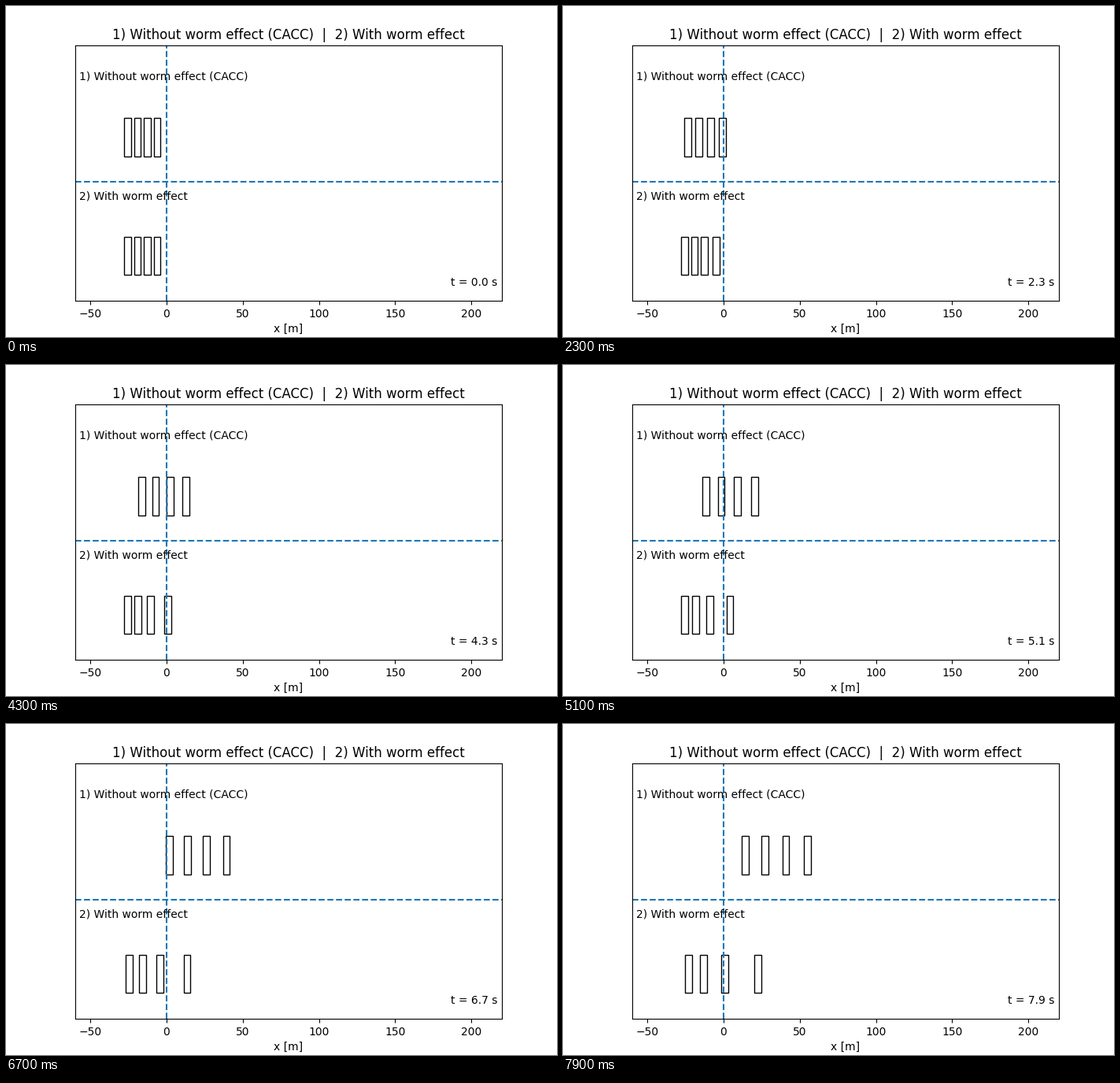
Write a matplotlib script that moves like this. It is 700 px wide and 420 px high and loops after 8000 ms.

```python
import numpy as np
import matplotlib.pyplot as plt
from matplotlib.animation import FuncAnimation
from matplotlib.patches import Rectangle

FRAMES, DT, CARS = 80, 0.1, 4
CAR_LEN, GAP, FRONT = 4.5, 2.0, -3.75
ACCEL, TOP_SPEED, EASE = 2.0, 13.1, 2.0
HEADWAY, K_GAP, K_SPEED = 0.6, 2.0, 0.9
BLUE = "#1f77b4"


def cacc_platoon():
    """Lead car speeds up; each follower keeps a time headway to the car ahead."""
    x, v, a = np.zeros((3, CARS))
    path = []
    for _ in range(FRAMES):
        path.append(x.copy())
        error = x[:-1] - x[1:] - HEADWAY * v[1:]
        closing = v[:-1] - v[1:]
        chase = a[:-1] + K_GAP * error + K_SPEED * closing
        push = min(ACCEL, EASE * (TOP_SPEED - v[0]))
        a = np.append(push, np.maximum(chase, 0))
        v = v + a * DT
        x = x + v * DT
    return np.array(path)


def worm_platoon():
    """Each car starts later and accelerates more gently than the one ahead."""
    t = np.arange(FRAMES)[:, None] * DT
    i = np.arange(CARS)
    delay, slowness = 0.9 + 1.2 * i, 1.31 + 0.28 * i
    return (np.maximum(t - delay, 0) / slowness) ** 2


fig, ax = plt.subplots(figsize=(7, 4.2), dpi=100)
ax.set(xlim=(-60, 220), ylim=(0, 1.5), yticks=[], xlabel="x [m]")
ax.set_title("1) Without worm effect (CACC)  |  2) With worm effect")
ax.axvline(0, ls="--", color=BLUE)
ax.axhline(0.7, ls="--", color=BLUE)

labels = ["1) Without worm effect (CACC)", "2) With worm effect"]
for y, text in zip((0.9, 0.43), labels):
    ax.text(0.01, y, text, transform=ax.transAxes, va="top")
clock = ax.text(0.99, 0.05, "", transform=ax.transAxes, ha="right", va="bottom")

start = FRONT - CAR_LEN - np.arange(CARS) * (CAR_LEN + GAP)
lanes = []
for y, path in ((0.85, cacc_platoon()), (0.15, worm_platoon())):
    boxes = [ax.add_patch(Rectangle((x, y), CAR_LEN, 0.225, fill=False, lw=1))
             for x in start]
    lanes.append((boxes, start + path))


def update(n):
    for boxes, path in lanes:
        for box, x in zip(boxes, path[n]):
            box.set_x(x)
    clock.set_text(f"t = {n * DT:.1f} s")
    return [box for boxes, _ in lanes for box in boxes] + [clock]


anim = FuncAnimation(fig, update, frames=FRAMES, interval=100,
                     repeat=True, repeat_delay=0, blit=False)
plt.show()
```
